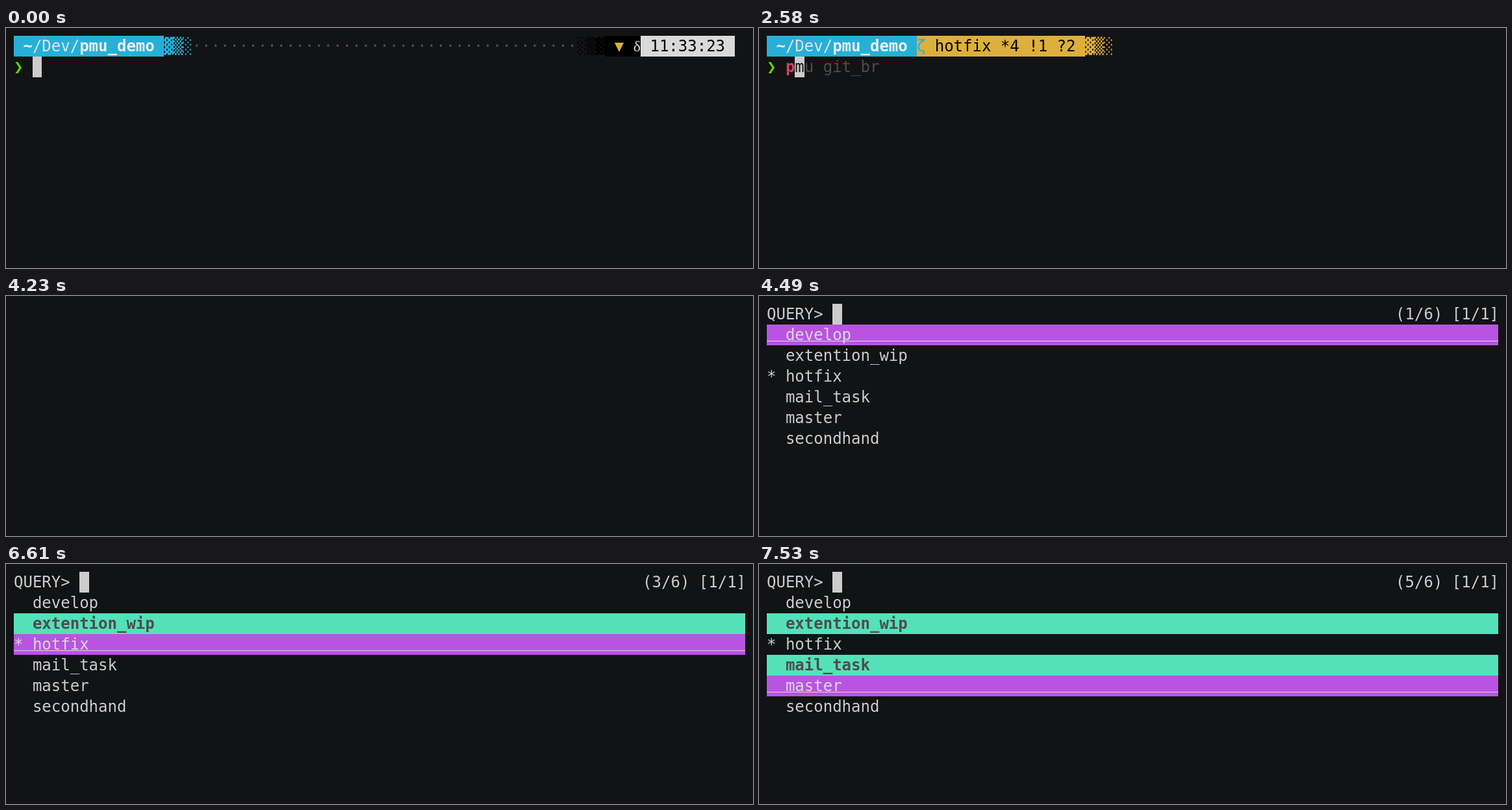
Animation, 1150 px wide and 370 px high, one loop 8 s. Source, as an HTML page:

```html
<!DOCTYPE html>
<html lang="en">
<head>
<meta charset="utf-8">
<title>Branch picker in a terminal</title>
<style>
  html, body { margin: 0; width: 100%; height: 100%; overflow: hidden; background: #121314; }
  .screen {
    position: absolute; left: 12px; top: 12px; width: 1126px; opacity: 0;
    font: 24px/32px "DejaVu Sans Mono", monospace; color: #ccc;
    font-variant-ligatures: none;
  }
  .line { display: flex; height: 32px; overflow: hidden; white-space: pre; }
  .line span { flex: none; height: 32px; }
  .delta { font: 24px/0 "Liberation Serif", serif; }
  .zeta { font: 24px/0 "DejaVu Sans", sans-serif; color: #26b0d7; }
  b { font-weight: bold; }
  .dir { background: #26b0d7; color: #e4e4e4; }
  .dir b { color: #eee; }
  .blue { color: #26b0d7; }
  .dots { color: #4d4d4d; }
  .black { color: #000; }
  .gold { color: #ddaf3c; }
  .status { background: #000; color: #d9d9d9; }
  .clock { background: #d9d9d9; color: #000; }
  .git { background: #ddaf3c; color: #000; }
  .arrow { color: #5fd700; font-weight: bold; }
  .ok { color: #4ebf22; }
  .bad { color: #dd3c69; font-weight: bold; }
  .hint { color: #4d4d4d; }
  .cursor { background: #ccc; color: #121314; }
  .current {
    background: #b954e1; color: #d9d9d9;
    text-decoration: underline 1px; text-underline-offset: 1px; text-decoration-skip-ink: none;
  }
  .marked { background: #54e1b9; color: #4d4d4d; font-weight: bold; }
</style>
</head>
<body>
<script>
const LOOP = 8000, COLS = 78;
const branches = ["  develop", "  extention_wip", "* hotfix", "  mail_task", "  master", "  secondhand"];

const span = (cls, text) => `<span class="${cls}">${text}</span>`;
const line = (html, cls = "") => `<div class="line ${cls}">${html}</div>`;
const cursor = (ch = " ") => span("cursor", ch);

const dir = span("dir", " <b>~</b>/Dev/<b>pmu_demo</b> ");
const idleBar = line(
  dir + span("blue", "▓▒░") + span("dots", "·".repeat(41)) + span("black", "░▒▓") +
  span("status", ` ${span("gold", "▼")} ${span("delta", "δ")}`) + span("clock", " 11:33:23 "));
const gitBar = line(
  dir + span("git", `${span("zeta", "ζ")} hotfix *4 !1 ?2 `) + span("gold", "▓▒░"));

const prompt = html => line(span("arrow", "❯") + span("", " ") + html);

function picker(row, marked = []) {
  const head = span("", "QUERY> ") + cursor() +
    span("", `(${row + 1}/6) [1/1]`.padStart(COLS - 8));
  return line(head) + branches.map((name, i) => {
    const cls = i === row ? "current" : marked.includes(i) ? "marked" : "";
    return line(span("", name.padEnd(COLS)), cls);
  }).join("");
}

const steps = [
  [0, idleBar + prompt(cursor())],
  [860, line(cursor())],
  [920, gitBar + prompt(cursor())],
  [2580, gitBar + prompt(span("bad", "p") + cursor("m") + span("hint", "u git_br"))],
  [2770, gitBar + prompt(span("bad", "pm") + cursor())],
  [2900, gitBar + prompt(span("ok", "pmu") + cursor() + span("hint", "git_br"))],
  [3500, gitBar + prompt(span("ok", "pmu") + span("", " git_br") + cursor())],
  [4230, ""],
  [4490, picker(0)],
  [6150, picker(1)],
  [6610, picker(2, [1])],
  [7200, picker(3, [1])],
  [7530, picker(4, [1, 3])]
];

const key = (time, opacity) => ({ offset: time / LOOP, opacity, easing: "step-end" });

steps.forEach(([start, html], i) => {
  const end = i + 1 < steps.length ? steps[i + 1][0] : LOOP;
  const screen = document.createElement("div");
  screen.className = "screen";
  screen.innerHTML = html;
  document.body.append(screen);
  const keys = [key(start, 1), key(end, 0)];
  if (start > 0) keys.unshift(key(0, 0));
  if (end < LOOP) keys.push(key(LOOP, 0));
  screen.animate(keys, { duration: LOOP, iterations: Infinity });
});
</script>
</body>
</html>
```
